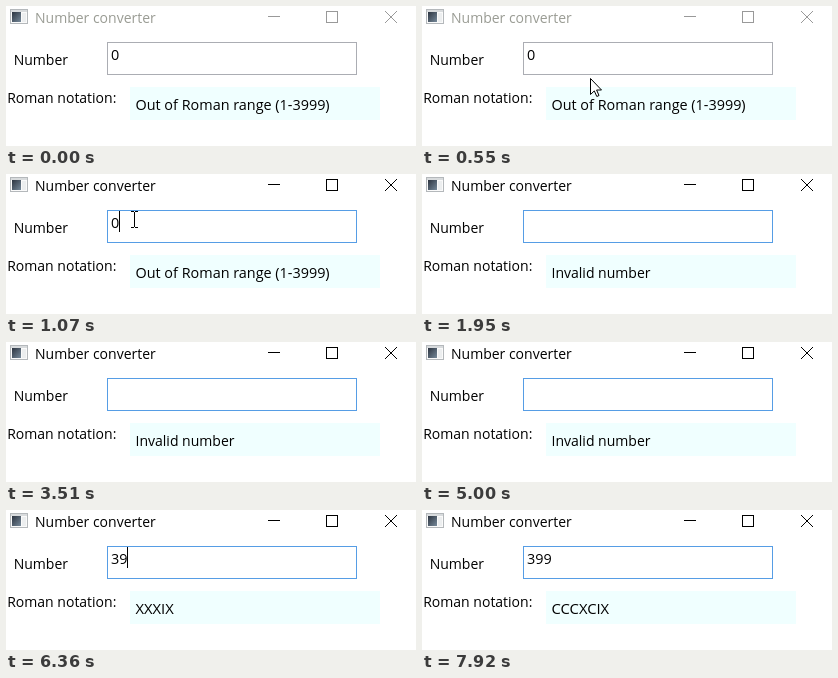
These frames come from a looping animation (410 px wide and 140 px high, 8 s). An HTML page:

```html
<!DOCTYPE html>
<html lang="en">
<head>
<meta charset="utf-8">
<title>Number converter</title>
<style>
  html, body { margin: 0; width: 100%; height: 100%; overflow: hidden; background: #fff; }
  svg { display: block; }
  text { font: 14px "Open Sans", "Noto Sans", sans-serif; white-space: pre; }
  #input { font-size: 14.4px; }
</style>
</head>
<body>
<svg width="410" height="140" viewBox="0 0 410 140">
  <defs>
    <linearGradient id="screen" x1="0" y1="0" x2="1" y2="1">
      <stop offset="0" stop-color="#2c3440"/>
      <stop offset="1" stop-color="#76899a"/>
    </linearGradient>
  </defs>
  <rect width="410" height="140" fill="#fff"/>

  <g shape-rendering="crispEdges">
    <rect x="4.5" y="3.5" width="17" height="14" fill="#fafafa" stroke="#b4b8bb"/>
    <rect x="5" y="4" width="16" height="2" fill="#d8dbdd"/>
    <rect x="6" y="6" width="9" height="10" fill="url(#screen)"/>
    <rect x="16" y="7" width="4" height="9" fill="#eceeef"/>
  </g>
  <text id="title" x="29" y="17">Number converter</text>
  <g id="buttons" fill="none">
    <path d="M262 10.5h12M320.5 5.5h11v11h-11z" shape-rendering="crispEdges"/>
    <path d="M379 5l12 12M391 5l-12 12"/>
  </g>

  <text x="7.7" y="59">Number</text>
  <rect id="field" x="101.5" y="36.5" width="249" height="32" fill="#fff" shape-rendering="crispEdges"/>
  <text id="input" x="105" y="54"></text>
  <rect id="caret" y="37" width="1" height="21" shape-rendering="crispEdges"/>

  <text x="1.2" y="97">Roman notation:</text>
  <rect x="124" y="81" width="250" height="33" fill="#f0ffff"/>
  <text id="result" x="129.5" y="104"></text>

  <path id="arrow" d="M.5 .5V16.5L4.3 12.9 6.8 18.5 9 17.5 6.6 12H11.5z" fill="#fff" stroke="#000" stroke-linejoin="round"/>
  <path id="beam" d="M-3-7.5h3M1-7.5h3M.5-7V8M-3 8.5h3M1 8.5h3" fill="none" stroke="#000"/>
</svg>
<script>
const LOOP = 8000;
const ACTIVATE = 960;
const $ = id => document.getElementById(id);
const set = (id, attrs) => {
  for (const name in attrs) $(id).setAttribute(name, attrs[name]);
};

// [start, text, caret x]
const edits = [
  [0, "0", 113], [1950, "", 105], [3700, "-", 112], [4440, "", 105],
  [5180, "3", 113], [6360, "39", 121], [7280, "399", 129]
];
// The caret toggles at each of these times, starting hidden.
const blinks = [
  960, 1520, 2020, 2520, 3020, 3510, 3700, 4190,
  4440, 5000, 5180, 5730, 6180, 6920, 7280, 7920
];
// [start, end, from, to, number of jumps]
const moves = [
  [120, 550, [202, 134], [168, 72], 7],
  [550, 880, [168, 72], [128, 45], 5],
  [880, 1200, [128, 45], [128, 45], 1],
  [1200, 1320, [138, 75], [138, 75], 1]
];

function toRoman(n) {
  const numerals = { C: 100, XC: 90, L: 50, XL: 40, X: 10, IX: 9, V: 5, IV: 4, I: 1 };
  let roman = "";
  for (const [sign, value] of Object.entries(numerals)) {
    while (n >= value) { roman += sign; n -= value; }
  }
  return roman;
}

function convert(text) {
  if (!/^\d+$/.test(text)) return ["Invalid number", 14];
  if (+text < 1) return ["Out of Roman range (1-3999)", 14.4];
  return [toRoman(+text), 14.8];
}

function pointerAt(t) {
  const move = moves.find(([start, end]) => t >= start && t < end);
  if (!move) return null;
  const [start, end, from, to, jumps] = move;
  const u = Math.floor((t - start) / (end - start) * jumps + 1e-6) / jumps;
  return from.map((v, i) => Math.round(v + (to[i] - v) * u));
}

function render(t) {
  const active = t >= ACTIVATE;
  const pointer = pointerAt(t);
  const hover = pointer !== null && pointer[1] < 69;
  const [, text, caretX] = edits.filter(([start]) => t >= start).pop();
  const [result, size] = convert(text);
  const caretOn = blinks.filter(time => t >= time).length % 2 === 1;

  set("title", { fill: active ? "#000" : "#9a9c94" });
  set("buttons", { stroke: active ? "#000" : "#999" });
  set("field", { stroke: active ? "#569de5" : hover ? "#7eb4ea" : "#abadb3" });
  set("caret", { x: caretX, visibility: caretOn ? "visible" : "hidden" });
  $("input").textContent = text;
  $("result").textContent = result;
  $("result").style.fontSize = size + "px";

  const place = pointer ? `translate(${pointer})` : "";
  set("arrow", { transform: place, visibility: pointer && !hover ? "visible" : "hidden" });
  set("beam", { transform: place, visibility: hover ? "visible" : "hidden" });
}

const began = performance.now();
function tick() {
  render((performance.now() - began) % LOOP);
  requestAnimationFrame(tick);
}
tick();
</script>
</body>
</html>
```
